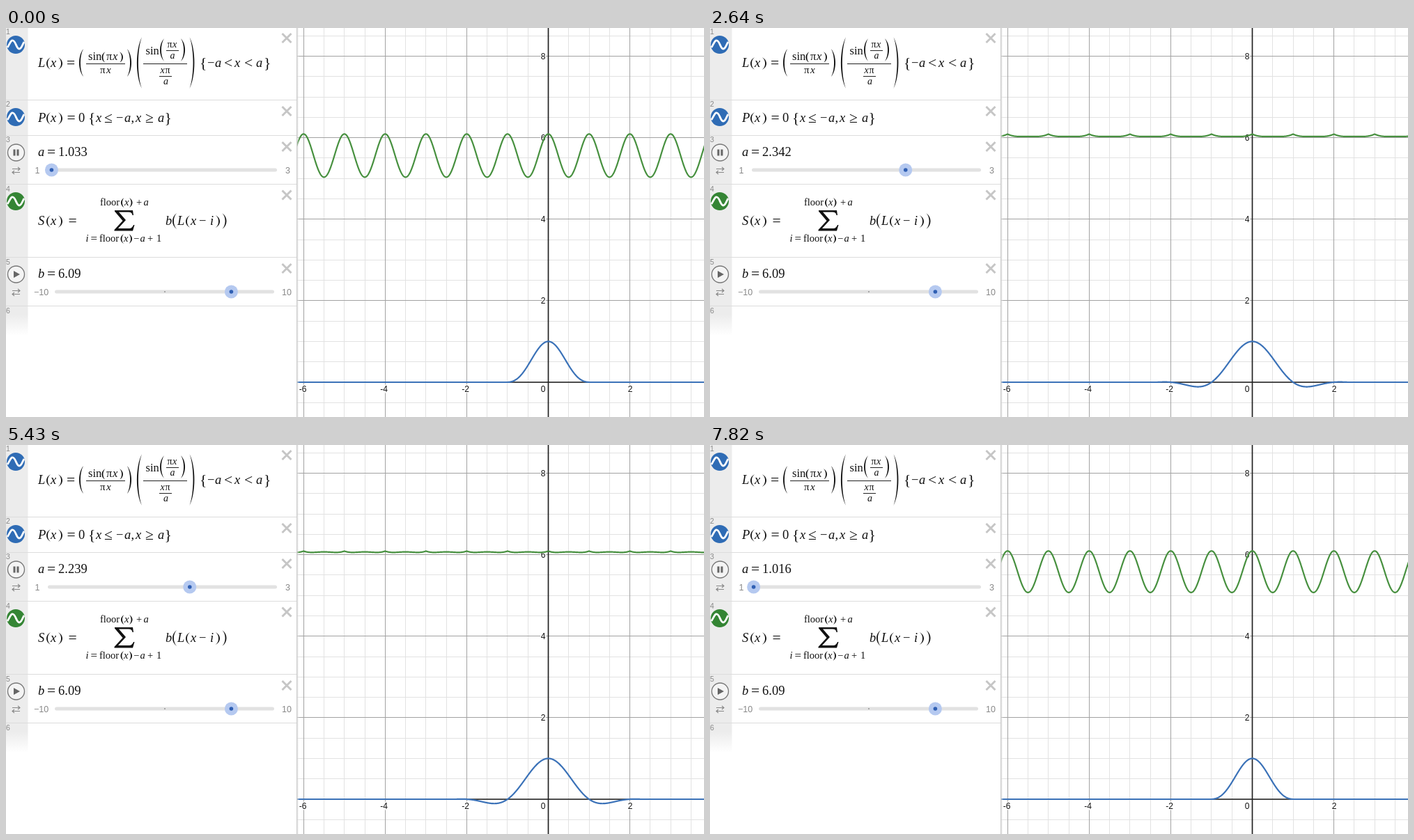
An HTML page that plays this animation: 1002x559 px, repeating every 7850 ms.

```html
<!DOCTYPE html>
<html lang="en">
<head>
<meta charset="utf-8">
<title>Windowed sinc</title>
<style>
  html, body { margin: 0; width: 100%; height: 100%; overflow: hidden; background: #fff; }
  svg { display: block; width: 1002px; height: 559px; }
  .math { font-family: "Liberation Serif", serif; fill: #111; }
  .ui { font-family: "Liberation Sans", Arial, sans-serif; }
  .curve { fill: none; stroke-width: 2.2; stroke-linecap: round; stroke-linejoin: round; }
</style>
</head>
<body>
<svg id="stage" viewBox="0 0 1002 559">
  <defs>
    <linearGradient id="fade" x2="0" y2="1">
      <stop offset="0" stop-color="#ececec"/><stop offset="1" stop-color="#fff"/>
    </linearGradient>
    <linearGradient id="shade">
      <stop offset="0" stop-color="#bbb"/><stop offset="1" stop-color="#fff" stop-opacity="0"/>
    </linearGradient>
    <clipPath id="plot"><path d="M418 0H1002V559H418Z"/></clipPath>
  </defs>
  <g id="grid"></g>
  <g clip-path="url(#plot)">
    <path id="blue" class="curve" stroke="#3b72b8"/>
    <path id="green" class="curve" stroke="#47903f"/>
  </g>
  <g id="panel"></g>
</svg>
<script>
const $ = id => document.getElementById(id);
let layer;

function add(tag, attrs, text) {
  const el = document.createElementNS("http://www.w3.org/2000/svg", tag);
  for (const k in attrs) el.setAttribute(k, attrs[k]);
  if (text) el.textContent = text;
  return layer.appendChild(el);
}
const rect = (x, y, width, height, fill, rx = 0) => add("rect", { x, y, width, height, fill, rx });
const line = (d, stroke, width = 1) => add("path", { d, stroke, "stroke-width": width, fill: "none" });
const circle = (cx, cy, r, fill, stroke = "none") => add("circle", { cx, cy, r, fill, stroke, "stroke-width": 1.3 });
const label = (x, y, text, size, fill, anchor = "start") =>
  add("text", { class: "ui", x, y, "font-size": size, fill, "text-anchor": anchor }, text);

// Pairs of x position and token; single Latin letters are italic, operators larger.
function math(y, size, ...items) {
  for (let i = 0; i < items.length; i += 2) {
    const s = items[i + 1], big = /[=≤≥<{}]/.test(s);
    add("text", {
      class: "math", x: items[i], y: y + (big ? 1 : 0), "font-size": big ? size * 1.17 : size,
      "font-style": /^[a-z]$/i.test(s) ? "italic" : "normal"
    }, s);
  }
}

// Opening paren from its left edge; a negative w closes from the right edge.
function paren(x, top, bottom, w = 6) {
  const k = Math.sign(w), q = (bottom - top) / 4, tip = x + w, out = x - w / 3, inn = out + 2.5 * k;
  add("path", { fill: "#111", d: `M${tip} ${top}C${out} ${top + q} ${out} ${bottom - q} ${tip} ${bottom}` +
    `C${inn} ${bottom - q} ${inn} ${top + q} ${tip} ${top}Z` });
}
function pair(x1, x2, top, bottom, w = 6) { paren(x1, top, bottom, w); paren(x2, top, bottom, -w); }

// Graph coordinates
const U = 58.55, X0 = 778.5, Y0 = 509;
const px = x => X0 + x * U, py = y => Y0 - y * U;

layer = $("grid");
for (const major of [false, true]) {
  const stroke = major ? "#a2a2a2" : "#e2e2e2";
  for (let k = -13; k < 20; k++) {
    if ((k % 4 === 0) !== major) continue;
    const x = Math.floor(px(k / 2)) + .5, y = Math.floor(py(k / 2)) + .5;
    if (x > 418) line(`M${x} 0V559`, stroke);
    line(`M418 ${y}H1002`, stroke);
  }
}
line(`M${X0} 0V559M418 ${Y0}H1002`, "#222", 1.7);
const mark = (x, y, s, anchor) => {
  const el = label(x, y, s, 12, "#111", anchor);
  el.setAttribute("stroke", "#fff");
  el.setAttribute("stroke-width", 3);
  el.setAttribute("paint-order", "stroke");
};
for (const [x, s] of [[426, "-6"], [542.5, "-4"], [659.5, "-2"], [771, "0"], [896, "2"]]) mark(x, 522.5, s, "middle");
for (const v of [2, 4, 6, 8]) mark(774.5, py(v) + 4, String(v), "end");

// Expression panel
layer = $("panel");
rect(0, 0, 417, 559, "#fff");
rect(417, 0, 4, 559, "url(#shade)");
rect(0, 0, 31.5, 412, "#ececec");
rect(0, 412, 31.5, 30, "url(#fade)");
for (const y of [103.5, 154.5, 224.5, 329.5, 399.5]) line(`M0 ${y}H417`, "#dcdcdc");
[9, 113, 164, 235, 340, 410].forEach((y, i) => label(0, y, String(i + 1), 10.5, "#888"));
for (const y of [14.5, 119.5, 170.5, 240, 345.5]) line(`M396.5 ${y - 6.5}l13 13m0 -13l-13 13`, "#c6c6c6", 3);

for (const [y, fill] of [[24, "#2f6cb5"], [128, "#2f6cb5"], [249, "#348534"]]) {
  circle(14, y, 13, fill);
  line(`M2 ${y + 4}C6 ${y - 2} 7 ${y - 7} 10 ${y - 6}C14 ${y - 5} 15 ${y + 6} 19 ${y + 6}C22 ${y + 6} 23 ${y + 1} 26 ${y - 4}`, "#fff", 2.8);
}
for (const y of [179, 354]) {
  circle(14.5, y, 12, "#f4f4f4", "#777");
  line(`M9 ${y + 23.5}H20m-3 -2.5l3 2.5l-3 2.5M20 ${y + 28.5}H9m3 -2.5l-3 2.5l3 2.5`, "#888", 1.1);
}
rect(10.5, 174.5, 3, 9, "#666");
rect(15.5, 174.5, 3, 9, "#666");
add("path", { d: "M11 349L20 354L11 359Z", fill: "#666" });

math(56, 18.5, 46, "L", 64, "x", 87, "=", 278, "{", 289, "−", 300, "a", 313, "<", 328, "x", 342, "<", 359, "a", 370, "}");
pair(58, 81, 42, 60);
pair(105, 180, 30, 70);
math(46, 16.5, 118, "sin", 144, "π", 153, "x");
pair(137.5, 168, 34, 50, 5);
line("M115 51.5H171M197 51.5H260", "#222", 1.1);
math(65, 15, 135, "π", 144, "x");
pair(188, 270.5, 13, 87, 7);
math(38, 16.5, 200.5, "sin");
pair(221, 257, 15, 48);
math(28, 14, 231.5, "π", 239, "x");
math(44, 14, 235.5, "a");
math(65, 14, 221.5, "x", 228.5, "π");
math(81, 14, 226, "a");
line("M230 32.5H248M220 69.5H238", "#222", 1.1);

math(135, 18.5, 46, "P", 64, "x", 87.5, "=", 104, "0", 118, "{", 129, "x", 141, "≤",
  158, "−", 170, "a", 179.5, ",", 186, "x", 200, "≥", 218, "a", 227.5, "}");
pair(58, 81, 121, 139);

math(184, 18.5, 46, "a", 59, "=", 75, "1.033");
const readout = layer.lastChild;
math(359, 18.5, 46, "b", 59, "=", 75, "6.09");

math(283, 18.5, 46, "S", 64, "x", 89.5, "=", 229, "b", 246, "L", 265, "x", 277, "−", 293, "i");
pair(58, 81, 269, 287);
pair(239, 316.5, 266, 289);
pair(258, 307, 269, 287);
add("path", { d: "M156 262H182L183 269H181.500Q181 264.500 176 264.500H162L172 276L161 288H177Q181 288 183 283H184.500L182 291.500H155.500V290L167.500 277L156 263.500Z", fill: "#111" });
math(255, 14.5, 135, "floor", 187, "+", 197.5, "a");
pair(165, 181.500, 244, 258, 4.5);
math(255, 14.5, 170, "x");
math(307, 14.5, 114.5, "i", 121.5, "=", 134, "floor", 169, "x", 183, "−", 192.5, "a", 203, "+", 216, "1");
pair(164.5, 181, 296, 310, 4.5);

rect(60, 201.5, 329, 5, "#e2e2e2", 2.5);
rect(70, 376.5, 315, 5, "#e2e2e2", 2.5);
circle(228, 379, 1.1, "#999");
label(41.5, 208.5, "1", 12.5, "#888");
label(401, 208.5, "3", 12.5, "#888");
label(40, 383.5, "−10", 12.5, "#888");
label(396, 383.5, "10", 12.5, "#888");
function knob(x, y) {
  const halo = circle(x, y, 9.5, "#b5c9f0"), dot = circle(x, y, 2.8, "#2f5fb3");
  return v => { halo.setAttribute("cx", v); dot.setAttribute("cx", v); };
}
knob(323.4, 379);
const moveKnob = knob(65, 204);

// Functions being plotted
const B = 6.09, LOOP = 7850, TOP = 3940;
const sinc = x => x ? Math.sin(Math.PI * x) / (Math.PI * x) : 1;
const L = (x, a) => Math.abs(x) < a ? sinc(x) * sinc(x / a) : NaN;
function S(x, a) {
  const n = Math.floor(x), last = Math.round(n + a);
  let sum = 0;
  for (let i = Math.round(n - a + 1); i <= last; i++) sum += B * L(x - i, a);
  return sum;
}

function trace(f) {
  let d = "", pen = "M";
  for (let x = 416; x <= 1004; x += .25) {
    const y = f((x - X0) / U);
    if (isNaN(y)) { pen = "M"; continue; }
    d += pen + x + " " + py(y).toFixed(2);
    pen = "L";
  }
  return d;
}

const keys = [[0, 1.033], [760, 1.408], [1680, 1.859], [2640, 2.342], [TOP, 3], [4650, 2.633], [6150, 1.875], [7820, 1.016], [LOOP, 1.001]];
function valueAt(t) {
  const i = keys.findIndex(k => k[0] > t), [t0, v0] = keys[i - 1], [t1, v1] = keys[i];
  return v0 + (v1 - v0) * (t - t0) / (t1 - t0);
}

function draw(now) {
  const t = now % LOOP, a = valueAt(t);
  readout.textContent = a.toFixed(3);
  moveKnob(60 + (a - 1) * 164.5);
  // the plot trails the slider by one step
  const g = Math.min(2.9999, Math.max(1.0001, a + (t < TOP ? -.013 : .013)));
  $("green").setAttribute("d", trace(x => S(x, g)));
  $("blue").setAttribute("d", trace(x => Math.abs(x) < g ? L(x, g) : 0));
}

let start;
function tick(now) {
  start ??= now;
  draw(now - start);
  requestAnimationFrame(tick);
}
draw(0);
requestAnimationFrame(tick);
</script>
</body>
</html>
```
